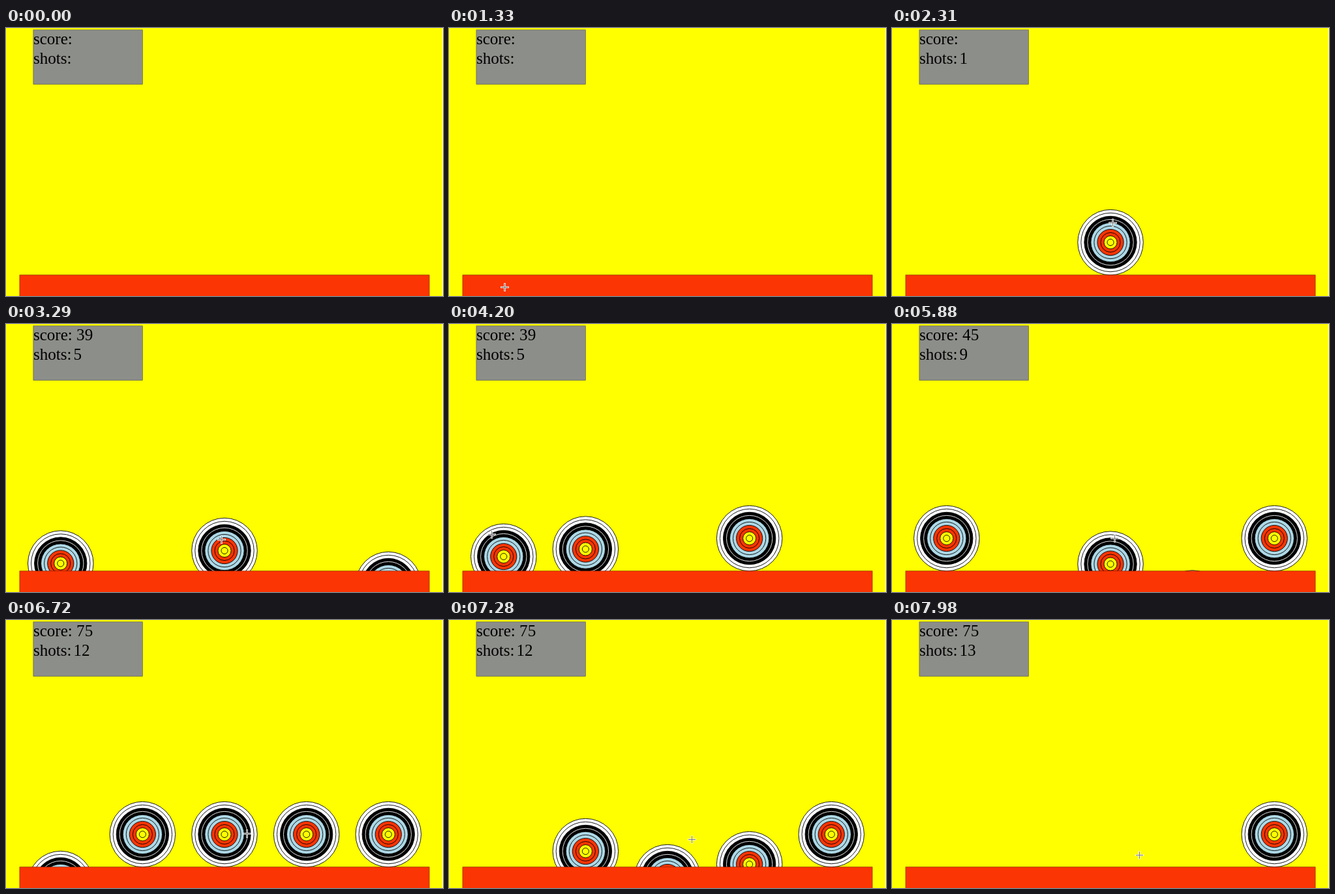
Animation of 670x412 px, one loop 8000 ms. Source, as an HTML page with a canvas:

```html
<!DOCTYPE html>
<html lang="en">
<head>
<meta charset="utf-8">
<title>Target shooting</title>
<style>
  html, body { margin: 0; width: 100%; height: 100%; overflow: hidden; background: #ff0; }
  canvas { display: block; }
</style>
</head>
<body>
<canvas id="stage" width="670" height="412"></canvas>
<script>
const ctx = document.getElementById('stage').getContext('2d');
const WIDTH = 670, HEIGHT = 412, LOOP = 8000, STEP = 70;

// The scene is laid out on a grid of 16 units across.
const UNIT = WIDTH / 16, TOP = 2.9;
const FLOOR = TOP + 9 * UNIT;
const RADIUS = 1.2 * UNIT;
const RISE_SPEED = 0.2, SHOT_GAP = 160;
const RED = '#fb3503';

// Each target alternates between rising and sinking at these times.
const toggles = [
  [2980, 4060, 5000, 6340],
  [3780, 4900, 6000, 7150],
  [1400, 3195, 5575, 6950],
  [3500, 4700, 5875, 7050],
  [2350, 2935, 5100]
];

// Where the pointer stops, how often it fires there and what that earns.
const stops = [
  { at: 0, x: 16, y: 425, shots: 0, points: 0 },
  { at: 2050, x: 338, y: 299, shots: 1, points: 0 },
  { at: 2600, x: 330, y: 331, shots: 4, points: 39 },
  { at: 4060, x: 65, y: 323, shots: 4, points: 6 },
  { at: 5880, x: 341, y: 329, shots: 3, points: 30 },
  { at: 6720, x: 369, y: 328, shots: 0, points: 0 },
  { at: 7560, x: 379, y: 361, shots: 1, points: 0 }
];

const clamp = (v, low, high) => Math.min(high, Math.max(low, v));

function box(x, y, w, h, fill, stroke) {
  ctx.fillStyle = fill;
  ctx.fillRect(x, y, w, h);
  ctx.strokeStyle = stroke;
  ctx.lineWidth = 0.6;
  ctx.strokeRect(x, y, w, h);
}

function drawTarget(x, y) {
  const bands = ['#fff', '#000', '#add8e6', RED, '#ff0'];
  for (let ring = 0; ring < 10; ring++) {
    ctx.beginPath();
    ctx.arc(x, y, RADIUS * (1 - ring / 10), 0, Math.PI * 2);
    ctx.fillStyle = bands[ring >> 1];
    ctx.fill();
    ctx.strokeStyle = ring === 3 ? '#fff' : '#000';
    ctx.lineWidth = 0.9;
    ctx.stroke();
  }
}

function heightAt(times, t) {
  let height = 0;
  times.forEach((time, i) => {
    const span = Math.min(t, times[i + 1] ?? LOOP) - time;
    const direction = i % 2 ? -1 : 1;
    if (span > 0) height = clamp(height + direction * span * RISE_SPEED, 0, 2 * RADIUS);
  });
  return height;
}

// The pointer rests for the first half of each leg, then eases to the next stop.
function pointerAt(t) {
  const i = stops.findLastIndex(stop => stop.at <= t);
  const from = stops[i], to = stops[i + 1] ?? from;
  const u = clamp(2 * (t - from.at) / (to.at - from.at || 1) - 1, 0, 1);
  const k = to === from ? 0 : u * u * (3 - 2 * u);
  return [from.x + (to.x - from.x) * k, from.y + (to.y - from.y) * k];
}

function tallyAt(t) {
  let shots = 0, score = 0;
  for (const stop of stops) {
    const fired = clamp(Math.floor((t - stop.at) / SHOT_GAP), 0, stop.shots);
    shots += fired;
    if (fired) score += Math.round(stop.points * fired / stop.shots);
  }
  return { shots, score };
}

function cross(x, y, reach, width, color) {
  ctx.fillStyle = color;
  ctx.fillRect(x - reach, y - width / 2, reach * 2, width);
  ctx.fillRect(x - width / 2, y - reach, width, reach * 2);
}

function draw(t) {
  ctx.fillStyle = '#ff0';
  ctx.fillRect(0, 0, WIDTH, HEIGHT);
  ctx.fillStyle = '#ffffc0';
  ctx.fillRect(WIDTH - 1, 0, 1, HEIGHT);

  toggles.forEach((times, i) => {
    const height = heightAt(times, t);
    if (height > 0) drawTarget((2 + 3 * i) * UNIT, FLOOR + RADIUS - height);
  });
  box(UNIT / 2, FLOOR, 15 * UNIT, UNIT, RED, '#7a1a00');
  box(UNIT, TOP, 4 * UNIT, 2 * UNIT, '#8c8e89', '#55564c');

  const { shots, score } = tallyAt(t);
  ctx.fillStyle = '#000';
  ctx.font = `${0.6 * UNIT}px "Liberation Serif", serif`;
  ctx.fillText('score: ' + (score || ''), UNIT, 24.5);
  ctx.fillText('shots:', UNIT, 54.5);
  ctx.fillText(shots || '', 2.47 * UNIT, 54.5);

  const [x, y] = pointerAt(t).map(v => Math.round(v) + 0.5);
  cross(x, y, 6.5, 3, 'rgba(255,255,255,.75)');
  cross(x, y, 5.5, 1, '#777');
}

const start = performance.now();
function frame() {
  const t = (performance.now() - start) % LOOP;
  draw(Math.floor(t / STEP) * STEP);
  requestAnimationFrame(frame);
}
frame();
</script>
</body>
</html>
```
